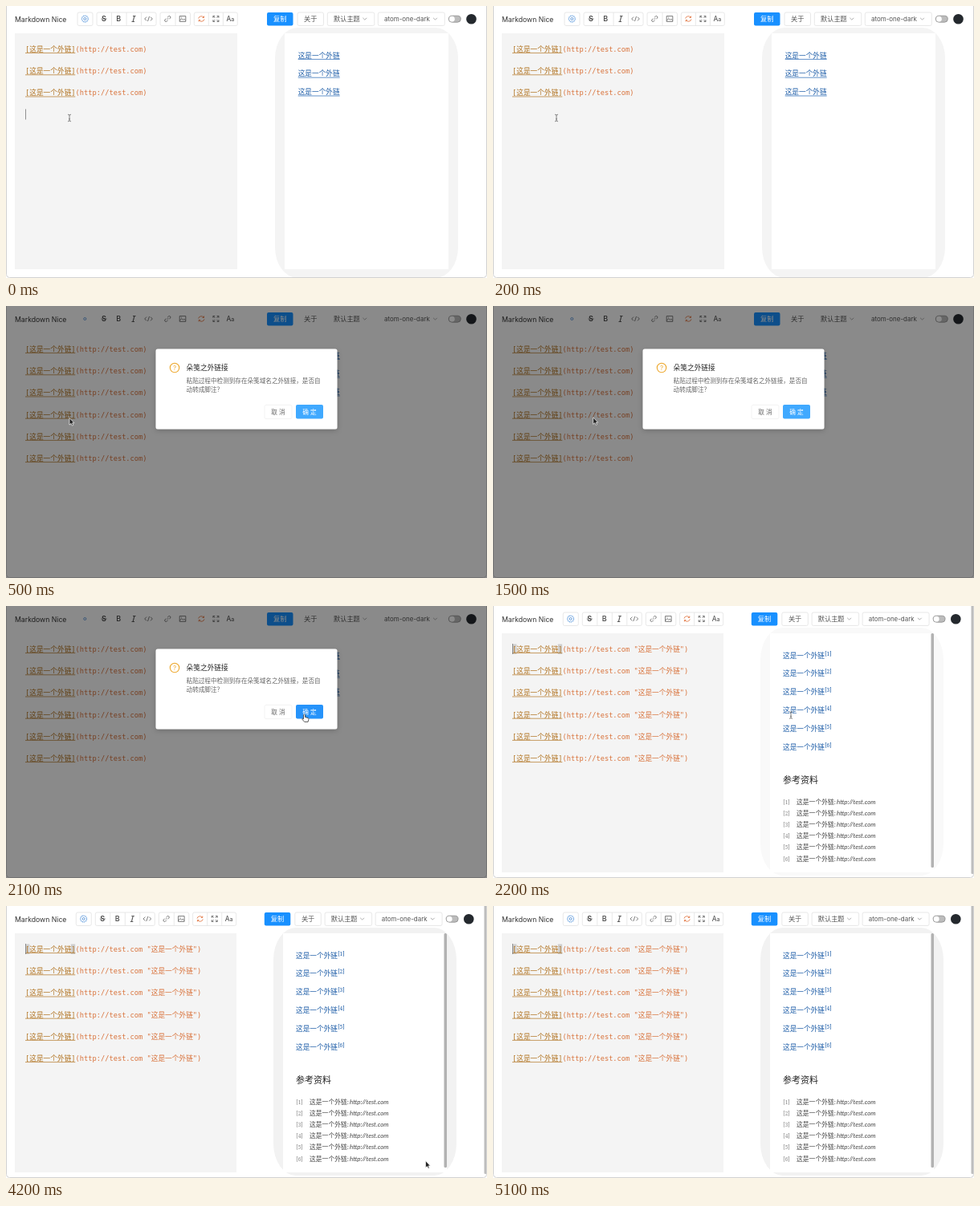
These frames come from a looping animation (599x339 px, 5.3 s). An HTML page:

```html
<!DOCTYPE html>
<html lang="zh-CN">
<head>
<meta charset="utf-8">
<title>外链转脚注</title>
<style>
html, body { margin: 0; width: 100%; height: 100%; overflow: hidden; background: #fff; }
svg { display: block; width: 599px; height: 339px; }
text { white-space: pre; font-family: Inter, "Noto Sans CJK SC", "Noto Sans CJK", sans-serif; }
.code { font: 8.7px "DejaVu Sans Mono", "Noto Sans CJK SC", "Noto Sans CJK", monospace; fill: #d9733c; }
.code .name { fill: #b27422; }
.link { font-size: 8.67px; font-weight: 500; fill: #1f5ea8; }
.sup, .num { font-family: "Noto Serif", serif; }
.url { font-family: Lato, sans-serif; font-style: italic; }
.icon { fill: none; stroke: #5c5c5c; stroke-width: .8; }
.box { fill: #fff; stroke: #e2e2e2; stroke-width: .8; }
</style>
</head>
<body>
<svg id="stage" viewBox="0 0 599 339" xmlns="http://www.w3.org/2000/svg">
  <defs>
    <filter id="soft" x="-20%" y="-20%" width="140%" height="150%">
      <feDropShadow dx="0" dy="2" stdDeviation="3" flood-opacity=".2"/>
    </filter>
  </defs>
  <rect width="599" height="339" fill="#fff"/>
  <g id="panels">
    <rect id="editor" x="11" y="34" fill="#f4f4f4"/>
    <rect id="halo" y="27"/>
    <rect id="paper" y="34" width="204" fill="#fff"/>
  </g>
  <g id="lines"></g>
  <rect id="caret" width=".8" height="13" fill="#777"/>
  <g id="links"></g>
  <g id="notes"></g>
  <text x="11" y="19.8" font-size="8.7" fill="#333">Markdown Nice</text>
  <g id="tools"></g>
  <g id="menu"></g>
  <rect x=".5" y="-4" width="598" height="342.5" rx="4" fill="none" stroke="#d2d2d2"/>
  <rect id="shade" width="599" height="339"/>
  <g id="modal">
    <rect x="186.5" y="53.5" width="226" height="100" rx="2.5" fill="#fff" filter="url(#soft)"/>
    <circle cx="210" cy="77" r="5.7" fill="none" stroke="#eda72b" stroke-width="1.1"/>
    <text x="210" y="80" font-size="8" text-anchor="middle" fill="#eda72b">?</text>
    <text x="224.6" y="80.3" font-size="8.7" font-weight="500" fill="#262626">朵笺之外链接</text>
    <g font-size="7.6" fill="#666">
      <text x="224.6" y="96">粘贴过程中检测到存在朵笺域名之外链接，是否自</text>
      <text x="224.6" y="107.4">动转成脚注？</text>
      <rect x="322" y="123.3" width="34" height="17.3" rx="2" fill="none" stroke="#eee" stroke-width=".7"/>
      <text x="339" y="135" text-anchor="middle">取 消</text>
    </g>
    <rect id="ok" x="361" y="123" width="34" height="17.6" rx="2"/>
    <text x="378" y="135" font-size="7.7" font-weight="500" text-anchor="middle" fill="#fff">确 定</text>
  </g>
  <g id="pointer">
    <path id="arrow" d="M0 0V8.6L2 6.9L3.4 9.6L4.8 8.9L3.5 6.3H6Z" fill="#222" stroke="#fff" stroke-width=".7"/>
    <path id="beam" d="M-2 -4.3Q0 -4.3 0 -3Q0 -4.3 2 -4.3M0 -3V3M-2 4.3Q0 4.3 0 3Q0 4.3 2 4.3M-1 1.4H1" fill="none" stroke="#666" stroke-width=".8"/>
    <path id="hand" d="M-1 5V.7Q0 -.8 1 .7V3.5L4.8 4.6Q5.7 5 5.3 6.7L4.6 9.4H.2L-2.8 6Q-2.6 4.6 -1 5.8Z" fill="#fff" stroke="#333" stroke-width=".8"/>
  </g>
</svg>
<script>
const LOOP = 5300, STEP = 100, COUNT = 6;
const NAME = '这是一个外链', URL_TEXT = 'http://test.com';
const $ = id => document.getElementById(id);
const set = (id, attrs) => { for (const k in attrs) $(id).setAttribute(k, attrs[k]); };
const show = (id, on) => set(id, { display: on ? 'inline' : 'none' });
const rows = make => Array.from({ length: COUNT }, (_, i) => make(i)).join('');
const clamp = v => Math.max(0, Math.min(1, v));
const smooth = p => p * p * (3 - 2 * p);

function buildEditor() {
  $('lines').innerHTML = rows(i => {
    const y = 57 + 27.2 * i;
    const match = i ? '' : `<path class="after" d="M24 47.5h5.4v12.5h-5.4zM80.8 47.5h5.4v12.5h-5.4z" fill="#cfcfcf"/>`;
    return `<g class="row">${match}
      <path d="M24 ${y + 1.6}h62.3" stroke="#b27422" stroke-width=".7"/>
      <text class="code" x="24" y="${y}"><tspan class="name">[${NAME}]</tspan>(${URL_TEXT}<tspan class="after"> "${NAME}"</tspan>)</text></g>`;
  });
}

function buildPreview() {
  const linkY = i => 64.6 + 22.8 * i;
  $('links').innerHTML = rows(i => i > 2 ? '' :
    `<text class="link" x="363.7" y="${linkY(i)}">${NAME}</text>
     <path d="M363.7 ${linkY(i) + 1.8}h52" stroke="#3b78bd" stroke-width=".8"/>`);
  $('notes').innerHTML = rows(i => {
    const y = 246.8 + 14.15 * i;
    return `<text class="link" x="361" y="${linkY(i)}">${NAME}</text>
      <text class="sup" x="413.2" y="${linkY(i) - 3}" font-size="6.6" fill="#1f5ea8">[${i + 1}]</text>
      <text class="num" x="361.3" y="${y}" font-size="6.6" fill="#888">[${i + 1}]</text>
      <text x="378" y="${y}" font-size="7.8" fill="#444">${NAME}:</text>
      <text class="url" x="428" y="${y}" font-size="7.9" fill="#444">${URL_TEXT}</text>`;
  }) + `<text x="361" y="221" font-size="11" font-weight="500" fill="#222">参考资料</text>
    <rect x="545.5" y="34" width="3.5" height="292" rx="1.5" fill="#b2b2b2"/>
    <rect x="595.5" y="-2" width="3" height="336" rx="1.5" fill="#bdbdbd"/>`;
}

function buildToolbar() {
  const frame = (x, w, cuts = '') =>
    `<rect class="box" x="${x}" y="8" width="${w}" height="16.5" rx="2"/><path class="box" d="${cuts}"/>`;
  const icon = (x, d, extra = '') => `<path class="icon" transform="translate(${x} 16)" d="${d}" ${extra}/>`;
  const label = (x, s, extra) => `<text x="${x}" y="19.2" font-size="9" text-anchor="middle" fill="#444" ${extra}>${s}</text>`;
  const chevron = x => icon(x, 'M-2.4 -1.2L0 1.2L2.4 -1.2', 'style="stroke:#999"');

  $('tools').innerHTML = `<g class="frames">
      ${frame(89, 19)}${frame(113, 74, 'M131.5 8v16.5M150 8v16.5M168.5 8v16.5')}
      ${frame(192, 37.5, 'M211 8v16.5')}${frame(234.3, 54, 'M252.3 8v16.5M270.4 8v16.5')}
      <circle cx="98.3" cy="16" r="3.9" fill="none" stroke="#75a9e2" stroke-width="1.2" stroke-dasharray="1.6 .6"/>
    </g>
    <circle cx="98.3" cy="16" r="1.5" fill="none" stroke="#5a94d6" stroke-width=".9"/>
    ${label(122, 'S', 'font-weight="600"')}${icon(122, 'M-3.5 0H3.5')}
    ${label(140.3, 'B', 'font-weight="500"')}
    ${icon(159, 'M-1 -3.5H2.5M-2.5 3.5H1M.9 -3.5L-.9 3.5', 'style="stroke-width:1.1"')}
    ${icon(177.5, 'M-2.5 -2.4L-4.8 0L-2.5 2.4M2.5 -2.4L4.8 0L2.5 2.4M1 -3L-1 3')}
    ${icon(201.3, 'M-.8 .8L.8 -.8M-.2 -1.8L1 -3A1.5 1.5 0 0 1 3.2 -.9L2 .3M.2 1.8L-1 3A1.5 1.5 0 0 1 -3.2 .9L-2 -.3')}
    ${icon(220, 'M-3.8 -3.4H3.8V3.4H-3.8ZM-3.6 2.2L-1.2 -.4L.5 1.4L1.8 .3L3.6 2M-2 -1.8h.8')}
    ${icon(243.3, 'M-3.6 -.4A3.6 3.2 0 0 1 3 -1.8M3.6 .4A3.6 3.2 0 0 1 -3 1.8M3.2 -3.5V-1.5H1.2M-3.2 3.5V1.5H-1.2', 'style="stroke:#e0703a"')}
    ${icon(261.4, 'M-1.2 -3.5H-3.5V-1.2M1.2 -3.5H3.5V-1.2M-1.2 3.5H-3.5V1.2M1.2 3.5H3.5V1.2M-3.5 -3.5L-1 -1M3.5 -3.5L1 -1M-3.5 3.5L-1 1M3.5 3.5L1 1')}
    ${label(279.4, 'A<tspan font-size="7">a</tspan>', 'style="font-size:8.4px"')}`;

  $('menu').innerHTML = `<g class="frames">${frame(363, 32.5)}${frame(400.3, 58.5)}${frame(463.3, 83)}</g>
    <rect x="325" y="8" width="32.5" height="16.5" rx="2" fill="#1890ff"/>
    <g font-size="8.2" fill="#555">
      <text x="341.2" y="19.2" text-anchor="middle" fill="#fff">复制</text>
      <text x="379.3" y="19.2" text-anchor="middle">关于</text>
      <text x="408" y="19.2">默认主题</text>
      <text x="471" y="18.8" font-size="7.95">atom-one-dark</text>
    </g>
    ${chevron(446.8)}${chevron(534.5)}
    <rect x="551.3" y="12.2" width="15" height="8" rx="4" fill="#bcbcbc" stroke="#8c8c8c" stroke-width=".8"/>
    <circle cx="555.4" cy="16.2" r="3.4" fill="#fff"/>
    <circle cx="579.5" cy="16.3" r="6.3" fill="#24292e"/>`;
}

// Pointer stops: time, x, y
const path = [
  [0, 79, 139.5], [1400, 79, 139.5], [1800, 371.5, 135], [2100, 371.5, 135], [2200, 371, 136],
  [2800, 371, 136], [3400, 517, 208], [3500, 517, 208], [3800, 525, 310],
  [3900, 525, 310], [4300, 522, 319], [4400, 522, 319], [4800, 522, 345], [LOOP, 522, 345]
];

function pointerAt(t) {
  const i = path.findIndex((p, k) => t >= p[0] && t < path[k + 1][0]);
  const [t0, x0, y0] = path[i], [t1, x1, y1] = path[i + 1];
  const p = smooth((t - t0) / (t1 - t0));
  return [x0 + (x1 - x0) * p, y0 + (y1 - y0) * p];
}

function caretAlpha(t) {
  if (t < 400) return 1 - clamp(t / 200);
  if (t < 2200) return 0;
  if (t < 2600) return 1;
  const n = Math.floor((t - 2600) / 490);
  const p = clamp(((t - 2600) % 490 + 60) / 120);
  return n % 2 ? p : 1 - p;
}

function render(t) {
  const done = t >= 2200, open = t >= 400 && !done, dark = open && t >= 500;
  const grow = clamp((t - 400) / 100);

  show('panels', !dark);
  set('editor', { width: done ? 276 : 277, height: done ? 298 : 294 });
  set('halo', done
    ? { x: 333, width: 228, height: 309, rx: 28, ry: 40, fill: t < 2300 ? '#f9f9f9' : '#f2f2f2' }
    : open ? { x: 325, width: 248, height: 320, rx: 40, ry: 50, fill: '#f4f4f4' }
    : { x: 335, width: 228, height: 312, rx: 28, ry: 38, fill: '#f4f4f4' });
  set('paper', { x: done ? 345 : 347, height: done ? 298 : 294 });
  document.querySelectorAll('.frames').forEach(g => g.style.display = dark ? 'none' : '');
  document.querySelectorAll('.after').forEach(g => g.style.display = done ? '' : 'none');
  document.querySelectorAll('.row').forEach((g, i) => g.style.display = t >= 400 || i < 3 ? '' : 'none');
  show('links', !done);
  show('notes', done);
  set('tools', { transform: `translate(${done ? -1.7 : 0} 0)` });
  set('menu', { transform: `translate(${done ? -3.2 : 0} 0)` });
  set('caret', { x: 24, y: done ? 47 : 128.5, opacity: caretAlpha(t) });

  show('shade', open);
  set('shade', { opacity: .12 + .34 * grow });
  show('modal', open);
  const scale = .79 + .21 * grow;
  set('modal', {
    opacity: .78 + .22 * grow,
    transform: `translate(299.5 ${105 - 1.5 * grow}) scale(${scale}) translate(-299.5 -103.5)`
  });
  set('ok', { fill: t < 2000 ? '#40a9ff' : '#2693fa' });

  const [x, y] = pointerAt(t);
  const hand = open && x > 361;
  const beam = t < 400 || (done && x < 480);
  set('pointer', { transform: `translate(${x} ${y})` });
  show('hand', hand);
  show('beam', beam);
  show('arrow', !hand && !beam);
}

buildEditor();
buildPreview();
buildToolbar();
const start = performance.now();
function tick() {
  const t = (performance.now() - start) % LOOP;
  render(Math.floor(t / STEP) * STEP);
  requestAnimationFrame(tick);
}
render(0);
requestAnimationFrame(tick);
</script>
</body>
</html>
```
